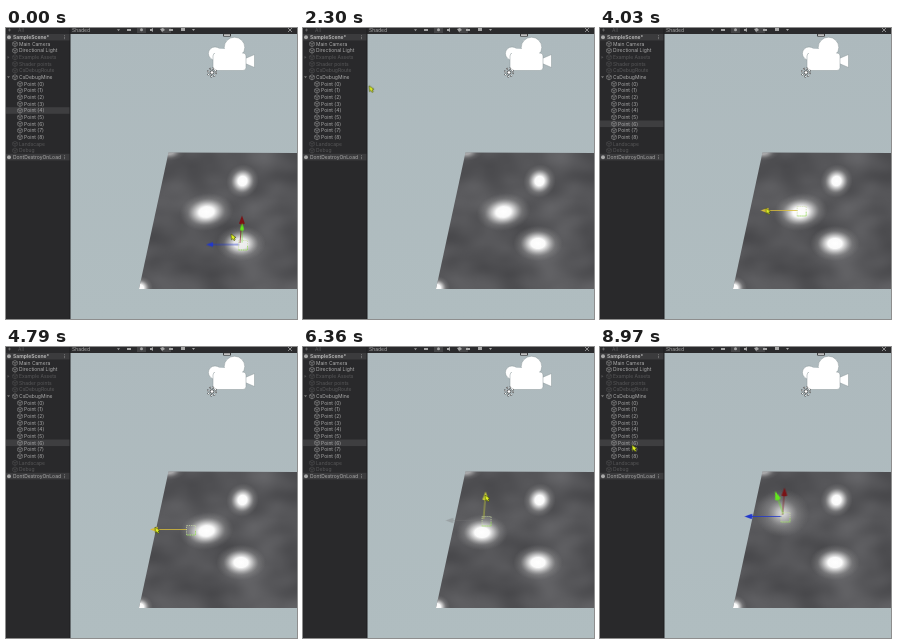
Recreate the animation shown at these times as an HTML page. Size 291 px wide and 291 px high, loop 9000 ms.

```html
<!DOCTYPE html>
<html lang="en">
<head>
<meta charset="utf-8">
<title>Scene editor</title>
<style>
html, body { margin: 0; width: 100%; height: 100%; overflow: hidden; background: #afbbbf; }
svg { display: block; width: 100vw; height: 100vh; }
text { font: 5px Inter, "Liberation Sans", sans-serif; fill: #ababab; white-space: pre; }
.bold { font-weight: 700; fill: #b4b4b4; }
.dim { opacity: .36; }
.cube { fill: none; stroke: #a0a0a0; stroke-width: .5; }

.anim { animation: 9s linear infinite; }
.step { animation: 9s step-end infinite; }
#cursor { animation-name: cursor; animation-timing-function: ease-in-out; }
#gizmo { animation-name: gizmo; }
#gizmoShow { animation-name: gizmoShow; }
#blue { color: #2138cc; animation-name: blue; }
#red { color: #7a1316; animation-name: red; }
#green { color: #62e81c; animation-name: green; }
#tilt { animation-name: tilt; }
#row4 { animation-name: row4; }
#row6 { animation-name: row6; }
#blobStart { animation-name: blobStart; }
#blobLeft { animation-name: blobLeft; }
#blobUp { animation-name: blobUp; }
#blobFront { animation-name: blobFront; }

@keyframes cursor {
  0% { transform: translate(225px, 206px); }
  8.4%, 20.5% { transform: translate(239px, 200px); }
  26% { transform: translate(64px, 56px); }
  28% { transform: translate(26px, 54px); }
  30.5% { transform: translate(26px, 92px); }
  31%, 35.3% { transform: translate(30px, 99px); }
  42%, 44% { transform: translate(166px, 180px); }
  52%, 55% { transform: translate(149px, 180px); }
  62%, 64% { transform: translate(181px, 155px); }
  70.67% { transform: translate(182px, 148px); }
  73.8%, 75% { transform: translate(184px, 142px); }
  81.1%, 84% { transform: translate(68px, 152px); }
  90% { transform: translate(36px, 74px); }
  95% { transform: translate(33px, 92px); }
  99.6%, 100% { transform: translate(32px, 98px); }
}
@keyframes gizmo {
  0%, 33.6% { transform: translate(236px, 217px); }
  33.61%, 44% { transform: translate(201px, 183px); animation-timing-function: ease-in-out; }
  52%, 64% { transform: translate(184px, 183px); }
  70.67% { transform: translate(182.5px, 174px); }
  73.8%, 100% { transform: translate(184.5px, 170px); }
}
@keyframes gizmoShow { 0% { opacity: 1; } 11% { opacity: 0; } 33.67% { opacity: 1; } }
@keyframes blue {
  0% { transform: scale(.9); }
  33.6% { transform: none; }
  43.8% { color: #d9bd3c; }
  55% { color: #2138cc; }
  64% { color: #777; opacity: .35; }
  74.3% { color: #2138cc; opacity: 1; }
}
@keyframes red {
  43.8% { opacity: 0; }
  55% { opacity: 1; }
  64% { color: #cfd63a; }
  74.3% { color: #7a1316; }
}
@keyframes green { 43.8% { opacity: 0; } 55% { opacity: 1; } 64% { opacity: 0; } 74.3% { opacity: 1; } }
@keyframes tilt {
  0% { transform: scale(.8); }
  33.6% { transform: rotate(-16deg); }
  55%, 100% { transform: rotate(-20deg); }
}
@keyframes row4 { 0% { opacity: 1; } 11%, 100% { opacity: 0; } }
@keyframes row6 {
  0% { opacity: 0; fill: #22507c; }
  33.67% { opacity: 1; fill: #22507c; }
  43.8%, 100% { opacity: 1; fill: #3e3e40; }
}
@keyframes blobStart { 0%, 55% { opacity: 1; } 57%, 99.99% { opacity: 0; } 100% { opacity: 1; } }
@keyframes blobLeft { 0%, 55% { opacity: 0; } 57%, 74.3% { opacity: 1; } 76.5%, 100% { opacity: 0; } }
@keyframes blobUp { 0%, 74.3% { opacity: 0; } 76.5%, 100% { opacity: 1; } }
@keyframes blobFront { 0%, 9% { opacity: .9; } 12%, 99.99% { opacity: 1; } 100% { opacity: .9; } }
</style>
</head>
<body>
<svg viewBox="0 0 291 291" preserveAspectRatio="none">
  <defs>
    <linearGradient id="sky" x2="0" y2="1">
      <stop stop-color="#adb9bd"/><stop offset="1" stop-color="#b0bdc0"/>
    </linearGradient>
    <radialGradient id="glow">
      <stop stop-color="#fff"/>
      <stop offset=".28" stop-color="#fafafa"/>
      <stop offset=".46" stop-color="#e0e0e0" stop-opacity=".72"/>
      <stop offset=".7" stop-color="#bbb" stop-opacity=".26"/>
      <stop offset="1" stop-color="#999" stop-opacity="0"/>
    </radialGradient>
    <radialGradient id="haze">
      <stop stop-color="#f2f2f2" stop-opacity=".9"/>
      <stop offset=".22" stop-color="#dcdcdc" stop-opacity=".72"/>
      <stop offset=".55" stop-color="#b4b4b4" stop-opacity=".34"/>
      <stop offset="1" stop-color="#999" stop-opacity="0"/>
    </radialGradient>
    <filter id="cloud" x="0" y="0" width="1" height="1" color-interpolation-filters="sRGB">
      <feTurbulence type="fractalNoise" baseFrequency=".022 .032" numOctaves="2" seed="7"/>
      <feColorMatrix values=".2 0 0 0 .235  .2 0 0 0 .235  .2 0 0 0 .247  0 0 0 0 1"/>
    </filter>
    <clipPath id="plane"><path d="M162.5 124.5L291 125V261H133Z"/></clipPath>
    <g id="cube"><path class="cube" d="M0-2.5L2.3-1.3V1.4L0 2.6L-2.3 1.4V-1.3ZM-2.3-1.3L0 0L2.3-1.3M0 0V2.6"/></g>
  </defs>

  <rect x="64" width="227" height="291" fill="url(#sky)"/>

  <g clip-path="url(#plane)">
    <rect x="130" y="122" width="161" height="141" filter="url(#cloud)"/>
    <g fill="url(#glow)">
      <ellipse cx="134" cy="260" rx="13" ry="12"/>
      <ellipse cx="163" cy="124" rx="16" ry="9" opacity=".5"/>
      <ellipse cx="236.5" cy="153" rx="16" ry="17" transform="rotate(25 236.5 153)"/>
      <ellipse id="blobFront" class="anim" cx="235" cy="215.5" rx="25" ry="18"/>
      <ellipse id="blobStart" class="anim" cx="200.5" cy="184" rx="27" ry="19" transform="rotate(-8 200.5 184)"/>
      <ellipse id="blobLeft" class="anim" cx="179" cy="185.5" rx="26" ry="18"/>
    </g>
    <ellipse id="blobUp" class="anim" cx="182.5" cy="166" rx="27" ry="24" fill="url(#haze)"/>
  </g>

  <!-- camera and light icons -->
  <g fill="#fff" stroke="#8b9698" stroke-width=".5">
    <circle cx="209" cy="25.5" r="6.6"/>
    <circle cx="228.5" cy="19.5" r="10.3"/>
    <path d="M238 31L248.5 26.5V39.5L238 35Z"/>
    <rect x="207" y="25" width="33" height="17.5" rx="3"/>
  </g>
  <path d="M209 20.5L222 21H236V28H209Z" fill="#fff"/>
  <path d="M217.5 6h7v2.2h-7z" fill="#f4f4f4" stroke="#222" stroke-width=".8"/>
  <g fill="#fff" stroke="#333" stroke-width=".7">
    <circle cx="206" cy="44.5" r="1.8"/>
    <circle cx="206" cy="44.5" r="4" fill="none" stroke="#222" stroke-width="1.9" stroke-dasharray="1.5 1.64"/>
    <circle cx="206" cy="44.5" r="4" fill="none" stroke="#fff" stroke-width="1.1" stroke-dasharray="1.2 1.94"/>
  </g>

  <!-- move handle -->
  <g id="gizmoShow" class="step"><g id="gizmo" class="anim">
    <g id="red" class="step">
      <path d="M-2-2L-.4-22" stroke="currentColor" stroke-width=".7"/>
      <path d="M-3-21.5Q0-19.8 2.8-21.5L0-29.5Z" fill="currentColor"/>
    </g>
    <g id="green" class="step"><g id="tilt" class="step">
      <path d="M0-3V-19" stroke="currentColor" stroke-width=".7"/>
      <path d="M-2.9-19Q0-17.3 2.9-19L0-27.5Z" fill="currentColor"/>
    </g></g>
    <g id="blue" class="step">
      <path d="M-3-.5H-33" stroke="currentColor" stroke-width=".8"/>
      <path d="M-32.5-3.2Q-31-.5-32.5 2.2L-40-.5Z" fill="currentColor"/>
    </g>
    <g fill="#fff" fill-opacity=".1" stroke-width=".7" stroke-dasharray="1.3 1">
      <path d="M-3.5-4.5H5.5V5H-3.5Z" stroke="#c9dca4"/>
      <path d="M-3.5 5H5.5V1" fill="none" stroke="#7edc3c"/>
    </g>
  </g></g>

  <!-- toolbar -->
  <rect x="64" width="227" height="6" fill="#2b2b2d"/>
  <text x="66" y="3.6">Shaded</text>
  <path d="M111 1.2h3l-1.5 2z" fill="#999"/>
  <path d="M131 0h9v5h-9zM156 0h9v5h-9z" fill="#434345"/>
  <g fill="#a6a6a6">
    <circle cx="135.5" cy="1.8" r="1.5"/>
    <path d="M121 1h4v2h-4zM144 1h1.5l1.5-1v4l-1.5-1h-1.5zM154 1l3-1 2 2-3 2zM163 1h4v2h-4zM175 0h4v3h-4zM186 1h3l-1.5 2z"/>
  </g>
  <path d="M282 0l4 4M286 0l-4 4" stroke="#a6a6a6" stroke-width=".8"/>

  <!-- hierarchy -->
  <rect width="64" height="291" fill="#29292b"/>
  <text x="12" y="3.8" class="dim">All</text>
  <path d="M2 2h3M3.5.5v3" stroke="#777" stroke-width=".6"/>
  <rect y="6" width="64" height="6.5" fill="#3b3b3d"/>
  <rect y="125.8" width="64" height="6.6" fill="#3b3b3d"/>
  <rect id="row4" class="step" y="79.2" width="64" height="6.6" fill="#3e3e40"/>
  <rect id="row6" class="step" y="92.5" width="64" height="6.6"/>
  <g id="list"></g>
  <rect x="63.5" width="1" height="291" fill="#1f1f20"/>

  <g id="cursor" class="anim">
    <path d="M0 0L.4 5.8L1.8 4.7L3 6.6L4.2 5.9L3.2 4L4.9 3.4Z" fill="#dcec26" stroke="#3e4a06" stroke-width=".6" stroke-linejoin="round"/>
  </g>
</svg>
<script>
const points = Array.from({ length: 9 }, (_, i) => ["Point (" + i + ")", 2]);
const rows = [
  ["SampleScene*", 0, "bold"],
  ["Main Camera", 1], ["Directional Light", 1],
  ["Example Assets", 1, "dim"], ["Shader points", 1, "dim"], ["CsDebugRoute", 1, "dim"],
  ["CsDebugMine", 1], ...points,
  ["Landscape", 1, "dim"], ["Debug", 1, "dim"],
  ["DontDestroyOnLoad", 0]
];
const dots = y => [-1.5, 0, 1.5].map(d => `<circle cx="58.5" cy="${y + d}" r=".45" fill="#aaa"/>`).join("");

document.getElementById("list").innerHTML = rows.map(([name, depth, style = ""], i) => {
  const y = 9.3 + i * 6.66;
  const x = [3, 9, 14][depth];
  const icon = depth
    ? `<use href="#cube" x="${x}" y="${y}"/>`
    : `<circle cx="${x}" cy="${y}" r="2" fill="#a8a8a8"/>${dots(y)}`;
  const open = name === "CsDebugMine" ? `<path d="M1 ${y - 1}h3l-1.5 2z" fill="#777"/>` : "";
  const shut = name === "Example Assets" ? `<path d="M1.5 ${y - 1.4}v2.8l2-1.4z" fill="#999"/>` : "";
  return `<g class="${style === "dim" ? "dim" : ""}">${open}${shut}${icon}` +
    `<text x="${x + 4}" y="${y + 1.8}" class="${style === "bold" ? "bold" : ""}">${name}</text></g>`;
}).join("");
</script>
</body>
</html>
```
